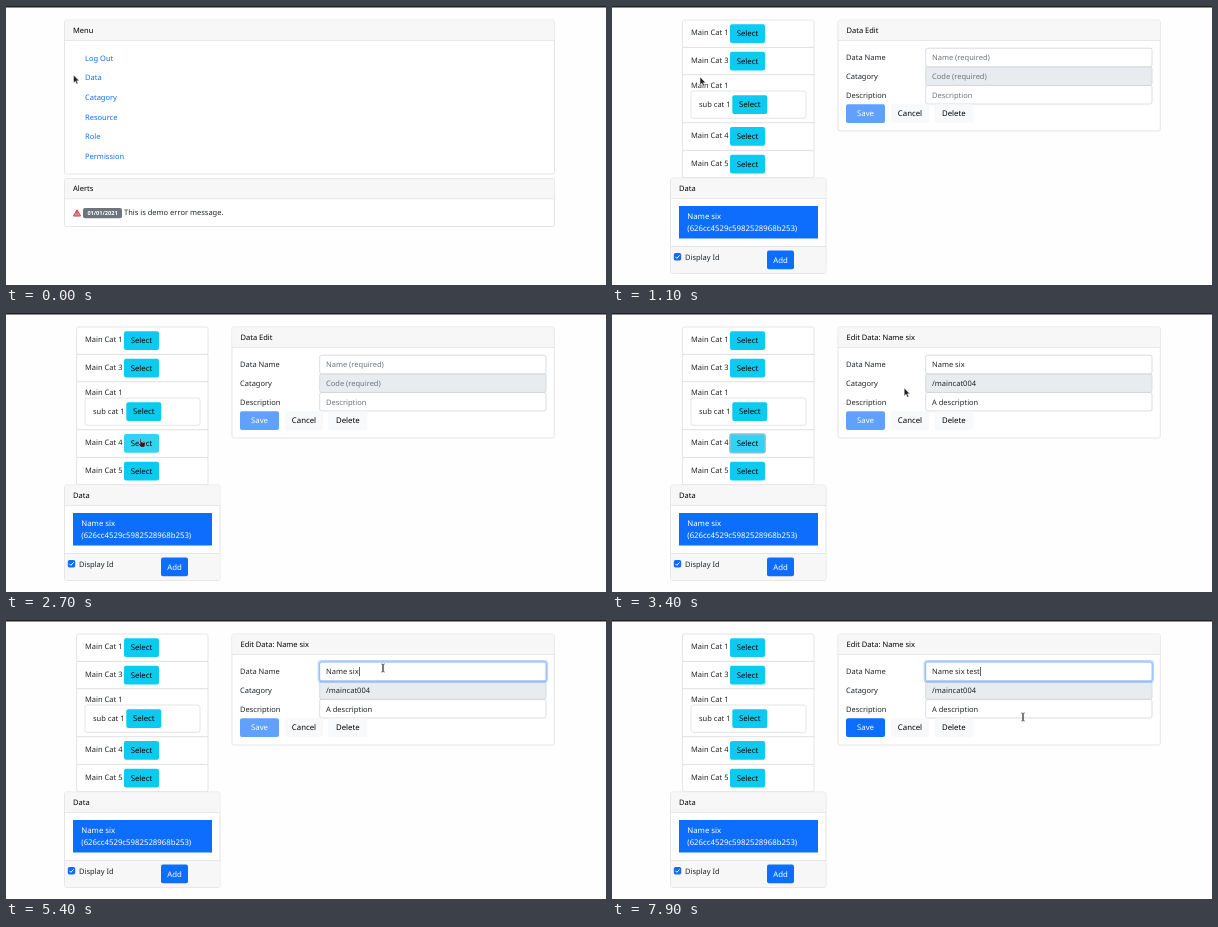
Recreate the animation shown at these times as an HTML page. Size 600 by 279 pixels, loop 8000 ms.

```html
<!DOCTYPE html>
<html>
<head>
<meta charset="utf-8">
<style>
html, body { margin: 0; width: 100%; height: 100%; overflow: hidden; background: #fefefe; }
svg { display: block; width: 600px; height: 279px; }
text { font: 7.5px "Noto Sans", "Open Sans", sans-serif; fill: #212529; white-space: pre; text-rendering: geometricPrecision; }
.link { fill: #0d6efd; }
.mid { text-anchor: middle; }
.white { fill: #fff; }
.black { fill: #000; }
.hint { fill: #6c757d; }
.wide { font-size: 7.8px; }
.badge { font-size: 5.6px; font-weight: 700; fill: #fff; }
</style>
</head>
<body>
<svg id="stage" viewBox="0 0 600 279"></svg>
<script>
const rect = (x, y, w, h, fill, attrs = '') =>
  `<rect x="${x}" y="${y}" width="${w}" height="${h}" fill="${fill}" ${attrs}/>`;
const text = (x, y, s, cls = '', attrs = '') => `<text x="${x}" y="${y}" class="${cls}" ${attrs}>${s}</text>`;
const box = (x, y, w, h, fill = '#fff', r = 2) =>
  rect(x, y, w, h, fill, `stroke="#dfdfdf" stroke-width=".8" rx="${r}"`);
const button = (x, y, w, label, fill, cls, id = '') =>
  `<g id="${id}">${rect(x, y, w, 18.7, fill, 'rx="2"')}${text(x + w / 2, y + 12.1, label, 'mid ' + cls)}</g>`;
const card = (x, y, w, h, title, id = '') => box(x, y, w, h) +
  rect(x + .4, y + .4, w - .8, 19.6, '#f7f7f7') + rect(x, y + 20, w, .7, '#dfdfdf') +
  text(x + 8.5, y + 12.7, title, 'black', `id="${id}"`);
const select = (x, y, id) => button(x, y, 35, 'Select', '#0dcaf0', 'black wide', id);

function menuPage() {
  const links = ['Log Out', 'Data', 'Catagory', 'Resource', 'Role', 'Permission'];
  return card(58.5, 14, 490, 154, 'Menu') +
    links.map((s, i) => text(79, 54.7 + i * 19.6, s, 'link')).join('') +
    card(58.5, 172.5, 490, 48, 'Alerts') +
    '<path d="M71 203.8l3.6 6.2h-7.2z" fill="#e99a9f" stroke="#c9404c" stroke-linejoin="round"/>' +
    '<path d="M71 205.7v2M71 208.5v.8" stroke="#b02a37" stroke-width=".8"/>' +
    rect(77, 202, 39, 10.3, '#6c757d', 'rx="2"') + text(96.5, 209.2, '01/01/2021', 'badge mid') +
    text(118, 209.4, 'This is demo error message.');
}

function categories() {
  const rows = [[14, 27.4, 1], [41.4, 27.4, 3], [68.8, 48, 1], [116.8, 27.6, 4], [144.4, 27.4, 5]];
  return rows.map(([y, h, n], i) => box(70.5, y, 131.5, h, '#fff', i % 4 ? 0 : 2) +
    text(79, y + (i == 2 ? 13.1 : 15.4), 'Main Cat ' + n) +
    (i == 2 ? '' : select(118, y + 4.3, i == 3 ? 'pick' : ''))).join('') +
    box(79, 85, 115, 27.3) + text(87, 100.7, 'sub cat 1') + select(120.3, 89.2);
}

function dataPage() {
  const field = (y, label, id, fill) => text(234, y + 12.1, label) +
    rect(313.7, y, 226.3, 18.6, fill, `id="${id}Box" stroke="#ced4da" stroke-width=".8" rx="2"`) +
    text(320, y + 12.1, '', '', `id="${id}"`);
  return categories() + card(58.5, 172, 155.5, 95.5, 'Data') +
    rect(67, 200, 139, 32.5, '#0d6efd') +
    text(75.3, 213.2, 'Name six', 'white wide') + text(75.3, 225, '(626cc4529c5982528968b253)', 'white wide') +
    rect(58.9, 240.3, 154.7, 26.8, '#f7f7f7') + rect(58.5, 240, 155.5, .7, '#dfdfdf') +
    rect(61.8, 247, 7.4, 7.4, '#0d6efd', 'rx="1.7"') +
    '<path d="M63.5 250.9l1.4 1.4 2.7-2.9" fill="none" stroke="#fff"/>' +
    text(73, 253.5, 'Display Id') + button(155, 244.5, 27, 'Add', '#0d6efd', 'white wide') +
    card(226, 14, 322.3, 111, 'Data Edit', 'title') +
    field(79.4, 'Description', 'desc', '#fff') + field(60.8, 'Catagory', 'code', '#e9ecef') +
    field(42.2, 'Data Name', 'name', '#fff') +
    rect(312.6, 41.1, 228.5, 20.8, 'none', 'id="ring" stroke="#0d6efd" stroke-opacity=".27" stroke-width="2" rx="3"') +
    rect(0, 47, .7, 9, '#222', 'id="caret"') +
    button(234, 98.2, 39, 'Save', '#0d6efd', 'white wide', 'save') +
    button(279, 98.2, 38, 'Cancel', '#f8f9fa', 'black wide') +
    button(322.3, 98.2, 39, 'Delete', '#f8f9fa', 'black wide');
}

const shapes = {
  arrow: '<path d="M0 0v8l1.9-1.7 1.2 2.8 1.5-.6-1.3-2.7h2.5z" fill="#222" stroke="#fff" stroke-width=".5"/>',
  hand: '<path d="M0 .5q.8-1 1.4 0v3l3.2.8q.9.3.7 1.5l-.7 3h-3.6l-2.8-3.3q.2-1 1.8 0z" fill="#222" stroke="#fff" stroke-width=".4"/>',
  beam: '<path d="M-1.7-4q1.7 0 1.7 1v6q0 1-1.7 1M1.7-4q-1.7 0-1.7 1v6q0 1 1.7 1" fill="none" stroke="#333" stroke-width=".8"/>'
};

stage.innerHTML = rect(0, 0, 600, 1.5, '#222') + `<g id="menu">${menuPage()}</g><g id="data">${dataPage()}</g>` +
  `<g id="cursor">${Object.keys(shapes).map(k => `<g id="${k}">${shapes[k]}</g>`).join('')}</g>`;
const el = id => document.getElementById(id);
const show = (id, on) => el(id).setAttribute('display', on ? 'inline' : 'none');
const set = (id, s, cls = '') => { el(id).textContent = s; el(id).setAttribute('class', cls); };

const LOAD = 1000, FILL = 3000, FOCUS = 4400;
const keys = [5800, 6000, 6200, 6500, 6700];
// time, x, y
const path = [[0, 67.5, 69], [200, 67.5, 69], [700, 88, 71], [1900, 88, 71], [2500, 134, 125.5], [3100, 134, 125.5],
  [3600, 377, 48], [7300, 377, 48], [7800, 411, 97]];

function pointer(t) {
  const i = path.findIndex(p => p[0] > t);
  if (i < 0) return path[path.length - 1].slice(1);
  const [a, x, y] = path[i - 1], [b, u, v] = path[i];
  let k = (t - a) / (b - a);
  k = k * k * (3 - 2 * k);
  return [x + (u - x) * k, y + (v - y) * k];
}

function draw(t) {
  const [x, y] = pointer(t);
  const inside = (l, top, r, b) => x > l && x < r && y > top && y < b;
  const loaded = t >= LOAD, filled = t >= FILL, focus = t >= FOCUS;
  const hover = loaded && inside(118, 121, 153, 140);
  const typed = keys.filter(k => k <= t).length;
  show('menu', !loaded);
  show('data', loaded);

  set('title', filled ? 'Edit Data: Name six' : 'Data Edit', 'black');
  set('name', filled ? 'Name six' + ' test'.slice(0, typed) : 'Name (required)', filled ? '' : 'hint');
  set('code', filled ? '/maincat004' : 'Code (required)', filled ? '' : 'hint');
  set('desc', filled ? 'A description' : 'Description', filled ? '' : 'hint');
  el('save').setAttribute('opacity', typed ? 1 : .65);

  const pick = el('pick').firstChild, held = filled && !focus;
  pick.setAttribute('fill', hover || held ? '#31d2f2' : '#0dcaf0');
  pick.setAttribute('stroke', held ? '#7cc6d6' : 'none');
  pick.setAttribute('stroke-width', 1.6);

  el('ring').setAttribute('opacity', Math.max(0, Math.min(1, (t - FOCUS) / 150)));
  el('nameBox').setAttribute('stroke', focus ? '#86b7fe' : '#ced4da');
  const since = t - (typed ? keys[typed - 1] : FOCUS);
  show('caret', focus && since % 1000 < 500);
  if (focus) el('caret').setAttribute('x', 320.4 + el('name').getComputedTextLength());

  const shape = hover || (!loaded && inside(79, 66, 97, 77)) ? 'hand'
    : loaded && inside(313, 42, 540, 98) ? 'beam' : 'arrow';
  for (const k in shapes) show(k, k == shape);
  el('cursor').setAttribute('transform', `translate(${x} ${y})`);
}

function tick() {
  draw(performance.now() % 8000);
  requestAnimationFrame(tick);
}
tick();
</script>
</body>
</html>
```
